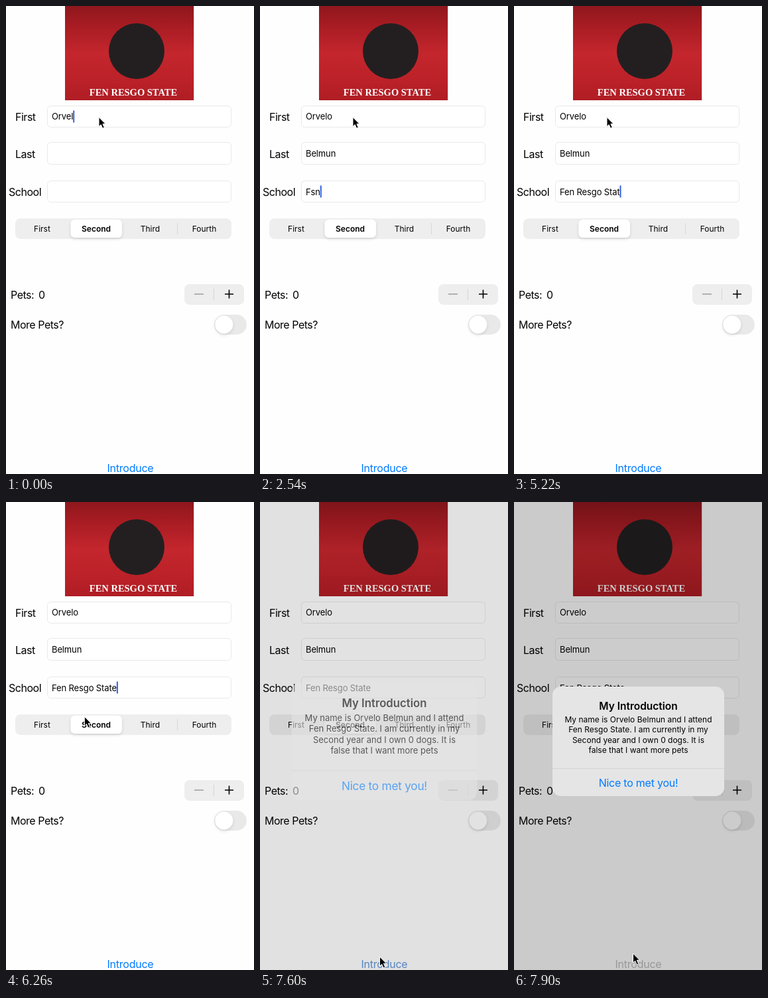
An HTML page for the animation above (8 s loop, 374 px wide and 705 px high).

```html
<!DOCTYPE html>
<html lang="en">
<head>
<meta charset="utf-8">
<title>Introduction form</title>
<style>
  html, body { margin: 0; width: 100%; height: 100%; overflow: hidden; background: #fefefe; }
  svg { display: block; width: 100vw; height: 100vh; }
  text { font-family: Inter, sans-serif; fill: #000; }
  .label { font-size: 16px; letter-spacing: -.03em; }
  .typed { font-size: 13px; letter-spacing: -.01em; }
  .seg { font-size: 12px; text-anchor: middle; }
  .mid { text-anchor: middle; }
  .label.mid { letter-spacing: -.015em; }
  .field { fill: #fff; stroke: #e9e9ea; }
  .note { font-size: 12px; text-anchor: middle; }
  .word { font: bold 14.5px "Liberation Serif", serif; fill: #fff; text-anchor: middle; }
</style>
</head>
<body>
<svg viewBox="0 0 374 705">
  <defs>
    <linearGradient id="banner" x2="0" y2="1">
      <stop offset="0" stop-color="#8f171d"/>
      <stop offset=".22" stop-color="#a91c23"/>
      <stop offset=".5" stop-color="#c4262d"/>
      <stop offset=".75" stop-color="#bd2229"/>
      <stop offset="1" stop-color="#b01d24"/>
    </linearGradient>
    <filter id="shade" x="-30%" y="-30%" width="160%" height="170%">
      <feDropShadow dx="0" dy="1.8" stdDeviation="2.3" flood-opacity=".14"/>
    </filter>
  </defs>

  <rect width="374" height="705" fill="#fefefe"/>

  <rect x="89" width="194.2" height="142" fill="url(#banner)"/>
  <circle cx="197" cy="68" r="42" fill="#231f20"/>
  <text class="word" x="192" y="135">FEN RESGO STATE</text>

  <text class="label" x="14" y="173">First</text>
  <text class="label" x="14" y="229">Last</text>
  <text class="label" x="4" y="286">School</text>
  <rect class="field" x="62.5" y="150.5" width="277" height="32" rx="5"/>
  <rect class="field" x="62.5" y="205.5" width="277" height="33" rx="5"/>
  <rect class="field" x="62.5" y="263.5" width="277" height="32" rx="5"/>
  <rect id="mark" x="66" y="270" width="28" height="20" rx="3" fill="#d3e2fb"/>
  <text class="typed" id="first" x="69" y="171"/>
  <text class="typed" id="last" x="69" y="227"/>
  <text class="typed" id="school" x="69" y="284.5"/>
  <rect id="caret" width="2" height="18" fill="#2f62e0"/>

  <rect x="14" y="320" width="326" height="31" rx="8" fill="#eeeeef"/>
  <rect x="97.5" y="321.5" width="77.5" height="27.5" rx="6.5" fill="#fff" filter="url(#shade)"/>
  <path d="M258.5 327V344" stroke="#d9d9da"/>
  <text class="seg" x="54.5" y="340">First</text>
  <text class="seg" x="136" y="340" font-weight="600">Second</text>
  <text class="seg" x="217.5" y="340">Third</text>
  <text class="seg" x="299" y="340">Fourth</text>

  <text class="label" x="7" y="440.5">Pets:</text>
  <text class="label" x="49" y="440.5">0</text>
  <rect x="269" y="419" width="90" height="31" rx="8" fill="#eeeeef"/>
  <path d="M284 434H298" stroke="#9b9b9d" stroke-width="1.5"/>
  <path d="M313.5 426V443" stroke="#d5d5d7"/>
  <path d="M330 434H343M336.5 427.5V440.5" stroke="#000" stroke-width="1.6"/>

  <text class="label" x="7" y="486">More Pets?</text>
  <rect x="314" y="465" width="49" height="30" rx="15" fill="#e9e9ea"/>
  <circle cx="328.8" cy="480" r="13.4" fill="#fff" filter="url(#shade)"/>

  <text class="label mid" id="button" x="187.5" y="701.5">Introduce</text>

  <rect id="dim" width="374" height="705"/>
  <g id="alert">
    <rect x="58" y="278" width="259" height="165" rx="13" fill="#e5e5e5"/>
    <path d="M58 401.5H317" stroke="#d3d3d4"/>
    <text class="mid" x="187.5" y="312.5" font-size="15.5" font-weight="600">My Introduction</text>
    <text class="note" x="187.5" y="332">My name is Orvelo Belmun and I attend</text>
    <text class="note" x="187.5" y="347.3">Fen Resgo State. I am currently in my</text>
    <text class="note" x="187.5" y="362.6">Second year and I own 0 dogs. It is</text>
    <text class="note" x="187.5" y="378">false that I want more pets</text>
    <text class="label mid" x="187.5" y="428.5" style="fill:#007aff">Nice to met you!</text>
  </g>

  <path id="pointer" d="M0 0V14.2L3.2 11.2L5.7 16.8L8.3 15.7L5.9 10.2H10.2Z" fill="#000" stroke="#fff" stroke-width="1" stroke-linejoin="round"/>
</svg>

<script>
const LOOP = 8000;
const el = id => document.getElementById(id);
const fields = ['first', 'last', 'school'].map(el);
const caretTop = [157.5, 213.5, 270.5];

// [time, field, letters]; field -1 hides the caret
const firstName = 'Orvelo', lastName = 'Belmun', place = 'Fen Resgo State';
const typing = [
  [0, 0, firstName.slice(0, 5)], [150, 0, firstName],
  [600, -1], [750, 1, ''], [1050, 1, lastName.slice(0, 1)],
  ...[1350, 1490, 1640, 1790].map((t, i) => [t, 1, lastName.slice(0, i + 3)]),
  [1940, 2, ''], [2240, 2, 'F'], [2540, 2, 'Fsn'],
  [3290, 2, 'Fs'], [3440, 2, 'F'],
  ...[[3590, 3], [3740, 4], [3890, 5], [4040, 7], [4340, 8], [4490, 9], [4630, 10],
      [4780, 12], [5080, 13], [5220, 14], [5520, 15]].map(([t, n]) => [t, 2, place.slice(0, n)]),
  [7600, -1]
];

// [time, dim, alert opacity, alert scale, button colour]
const looks = [
  [0, 0, 0, 1, '#007aff'],
  [7460, 0, 0, 1, '#3f9bfb'],
  [7600, .113, .6, 1.08, '#6096d8'],
  [7750, .18, .92, 1.02, '#96a9c4'],
  [7900, .2, 1, 1, '#bdbdbd']
];

// [step, x, y] of the pointer
const route = [[0, 140, 167.5], [3, 93, 290], [7, 255, 503], [12, 180.5, 685], [15, 180.5, 685], [16, 179.5, 680]];

const at = (list, t) => list.filter(k => k[0] <= t).pop();
const ease = p => p * p * (3 - 2 * p);

function pointerAt(t) {
  let n = Math.max(0, Math.floor((t - 5519) / 148.6));
  if (n === 8) n = 7; // brief rest
  const i = route.findIndex(k => k[0] > n);
  if (i < 0) return route[route.length - 1].slice(1);
  const a = route[i - 1], b = route[i];
  const p = ease((n - a[0]) / (b[0] - a[0]));
  return [1, 2].map(j => a[j] + (b[j] - a[j]) * p);
}

function draw(t) {
  const texts = ['', '', ''];
  let active = -1;
  for (const [time, field, letters] of typing) {
    if (time > t) break;
    active = field;
    if (field >= 0) texts[field] = letters;
  }
  fields.forEach((f, i) => { f.textContent = texts[i].replace(/ /g, '\u00a0'); });

  const caret = el('caret');
  caret.setAttribute('visibility', active < 0 ? 'hidden' : 'visible');
  if (active >= 0) {
    const width = texts[active] ? fields[active].getComputedTextLength() : 0;
    caret.setAttribute('x', 69 + width);
    caret.setAttribute('y', caretTop[active]);
  }
  el('mark').setAttribute('visibility', t >= 2840 && t < 3140 ? 'visible' : 'hidden');

  const [, dim, opacity, scale, colour] = at(looks, t);
  el('dim').setAttribute('opacity', dim);
  el('alert').setAttribute('opacity', opacity);
  el('alert').setAttribute('transform', `translate(187.5 360.5) scale(${scale}) translate(-187.5 -360.5)`);
  el('button').style.fill = colour;
  el('pointer').setAttribute('transform', `translate(${pointerAt(t).join(' ')})`);
}

const start = performance.now();
function tick() {
  draw((performance.now() - start) % LOOP);
  requestAnimationFrame(tick);
}
tick();
</script>
</body>
</html>
```
